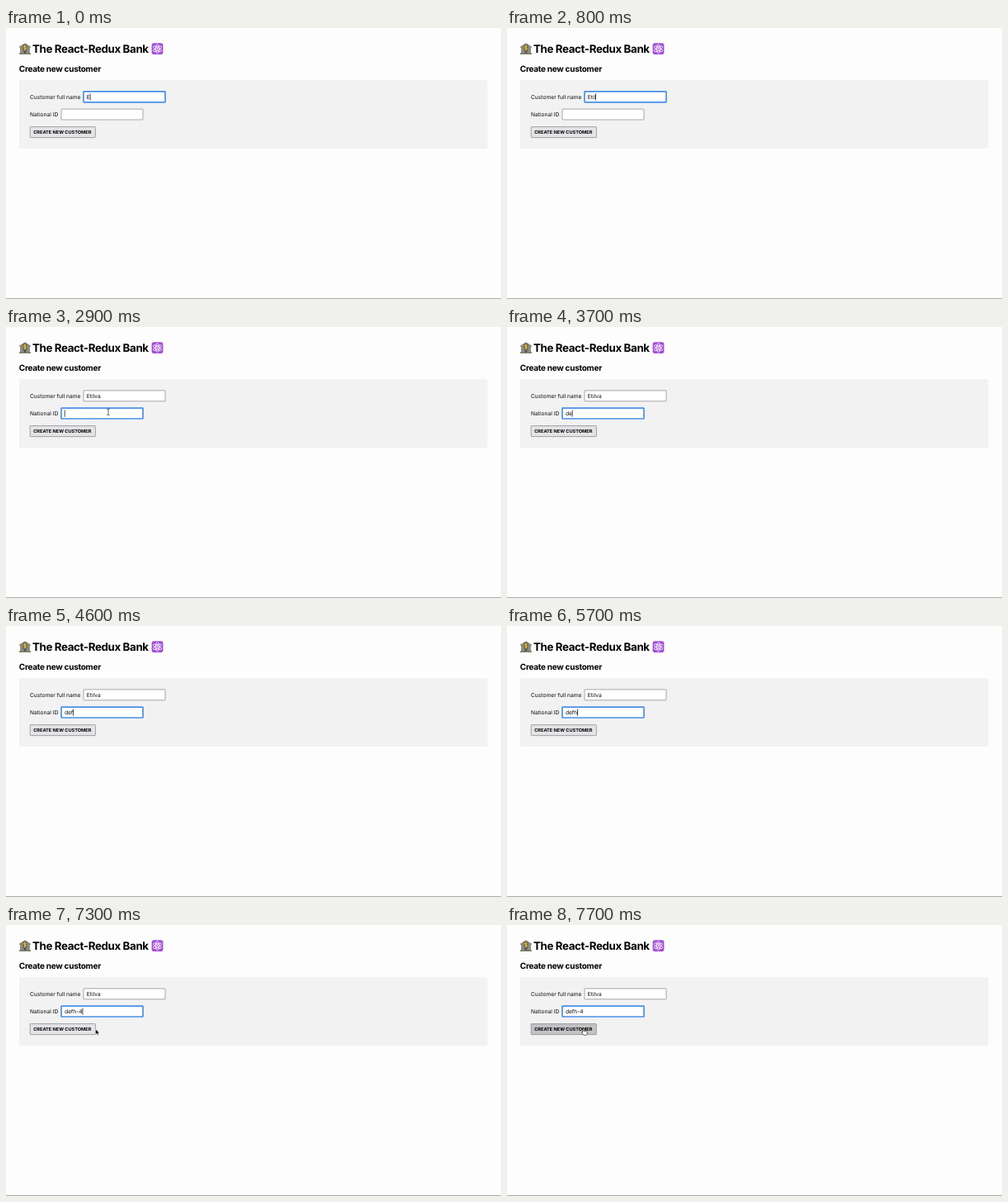
Write an HTML page that moves like this. It is 600 px wide and 328 px high and loops after 8000 ms.

```html
<!DOCTYPE html>
<html lang="en">
<head>
<meta charset="utf-8">
<title>The React-Redux Bank</title>
<style>
  html, body { margin: 0; width: 100%; height: 100%; overflow: hidden; background: #fdfdfd; }
  svg { display: block; width: 100vw; height: 100vh; }
  text {
    font: 400 6.67px Inter, "Liberation Sans", sans-serif;
    fill: #0c0c0c; text-rendering: geometricPrecision; white-space: pre;
  }
  .h1 { font-size: 13.33px; font-weight: 700; letter-spacing: -.028em; fill: #000; }
  .h2 { font-size: 10px; font-weight: 700; letter-spacing: -.028em; fill: #000; }
  .cta { font-size: 5.6px; font-weight: 700; fill: #000; }
  .field rect { fill: #fff; stroke: #858585; stroke-width: .7; }
  .field.focus rect { stroke: #4a90e8; stroke-width: 1.7; }
  .field line { stroke: #111; stroke-width: .75; }
  #button { fill: #e4e4e7; stroke: #858587; stroke-width: .7; }
  #button.hover { fill: #c3c3c6; }
</style>
</head>
<body>
<svg viewBox="0 0 600 328">
  <rect width="600" height="328" fill="#fdfdfd"/>
  <rect y="327" width="600" height="1" fill="#aaa"/>

  <g id="bank">
    <path d="M16.2 22.6 23 18.2 29.8 22.6V24H16.2Z" fill="#8b8980"/>
    <path d="M17 24H29V31H17Z" fill="#a5a399"/>
    <path d="M18.2 24V31M20.4 24V31M25.6 24V31M27.8 24V31" stroke="#6d6d69" stroke-width=".9"/>
    <rect x="20.6" y="20" width="4.8" height="7.8" rx="1.4" fill="#665e3c"/>
    <path d="M24.6 22.4Q23 21 21.8 22.1T23 23.9 24.2 25.6 21.4 25.4M23 20.7V27" fill="none" stroke="#f5d33f" stroke-width=".9"/>
    <rect x="21.7" y="28" width="2.6" height="3" fill="#494a4b"/>
    <rect x="16" y="30.6" width="14" height="1.3" fill="#797871"/>
    <path d="M16.2 30.8H20M26 30.8H29.8" stroke="#698c4a" stroke-width="1.3"/>
  </g>

  <g fill="none" stroke="#fff" stroke-width=".8">
    <rect x="176.6" y="18.3" width="13.8" height="13.8" rx="2.8" fill="#a34fd4" stroke="none"/>
    <ellipse cx="183.5" cy="25.2" rx="2.1" ry="5.5"/>
    <ellipse cx="183.5" cy="25.2" rx="2.1" ry="5.5" transform="rotate(60 183.5 25.2)"/>
    <ellipse cx="183.5" cy="25.2" rx="2.1" ry="5.5" transform="rotate(120 183.5 25.2)"/>
    <circle cx="183.5" cy="25.2" r=".9" fill="#fff" stroke="none"/>
  </g>

  <text class="h1" x="32" y="30">The React-Redux Bank</text>
  <text class="h2" x="15.8" y="53">Create new customer</text>
  <rect x="16" y="63.3" width="567.5" height="82.7" fill="#f2f2f2"/>

  <text x="29" y="85.9">Customer full name</text>
  <g class="field" id="name">
    <rect x="94" y="76.9" width="99" height="12.9" rx=".6"/>
    <text x="97.8" y="85.9"></text>
    <line y1="79.3" y2="87.6"/>
  </g>

  <text x="29" y="107.1">National ID</text>
  <g class="field" id="nid">
    <rect x="67" y="98.1" width="99" height="12.9" rx=".6"/>
    <text x="70.9" y="107.1"></text>
    <line y1="100.5" y2="108.8"/>
  </g>

  <rect id="button" x="29.2" y="119.6" width="79.2" height="13" rx=".6"/>
  <text class="cta" x="33.2" y="128.1">CREATE NEW CUSTOMER</text>

  <g id="mouse">
    <path id="arrow" d="M0 0V6.5L1.5 5.2 2.5 7.4 3.7 6.9 2.7 4.8H4.7Z" fill="#000" stroke="#fff" stroke-width=".5"/>
    <path id="beam" d="M-1.6-3.7Q0-3.7 0-2.8 0-3.7 1.6-3.7M0-2.8V2.8M-1.6 3.7Q0 3.7 0 2.8 0 3.7 1.6 3.7" fill="none" stroke="#222" stroke-width=".7"/>
    <path id="hand" d="M-.8 .6Q0-.5 .7 .6V3Q1.6 2.5 2.1 3.2 3 2.8 3.4 3.5 4.5 3.3 4.6 4.4 4.6 6.2 3.7 7.7H.2Q-1 6.2-2.2 4.6-2.2 3.5-.8 4.4Z" fill="#fff" stroke="#111" stroke-width=".6"/>
  </g>
</svg>
<script>
const LOOP = 8000, STEP = 100;
const FOCUS_ID = 2900;
const $ = id => document.getElementById(id);

// Times at which each character arrives.
const nameKeys = { value: "Etilva", times: [0, 300, 500, 800, 1500, 1700] };
const idKeys = { value: "defh-4", times: [3600, 3700, 4600, 4700, 6000, 6200] };

// Spans in which the caret is blinked off.
const caretOff = [[1100, 1500], [2100, 2600], [3400, 3600], [4200, 4600],
                  [5100, 5700], [6800, 7200], [7600, 8000]];

// Pointer paths as [time, x, y]; typing hides the pointer.
const paths = [
  { from: 2000, to: 3600, points: [[2000, 139, 84], [2200, 136, 87], [2400, 131, 95.3],
                                   [2600, 126, 102], [2800, 124, 103]] },
  { from: 6800, to: 8000, points: [[6800, 124, 103], [7000, 120, 112], [7300, 108.6, 126],
                                   [7500, 97, 126], [7700, 92.7, 125.5]] }
];

const typed = (keys, t) => keys.value.slice(0, keys.times.filter(k => k <= t).length);

function along(points, t) {
  const i = points.findIndex(p => p[0] > t);
  if (i < 0) return points[points.length - 1].slice(1);
  const [t0, x0, y0] = points[i - 1], [t1, x1, y1] = points[i];
  const k = (t - t0) / (t1 - t0);
  return [x0 + (x1 - x0) * k, y0 + (y1 - y0) * k];
}

function inside(rect, x, y) {
  const b = rect.getBBox();
  return x >= b.x && x <= b.x + b.width && y >= b.y && y <= b.y + b.height;
}

const show = (el, on) => el.setAttribute("visibility", on ? "visible" : "hidden");

function drawField(id, value, focused, caretOn) {
  const field = $(id), text = field.querySelector("text"), caret = field.querySelector("line");
  field.classList.toggle("focus", focused);
  if (text.textContent !== value) text.textContent = value;
  const x = +text.getAttribute("x") + (value ? text.getComputedTextLength() : 0) + .3;
  caret.setAttribute("x1", x);
  caret.setAttribute("x2", x);
  show(caret, focused && caretOn);
}

function drawMouse(t) {
  const path = paths.find(p => t >= p.from && t < p.to);
  let shape = "", hover = false;
  if (path) {
    const [x, y] = along(path.points, t);
    const overField = [...document.querySelectorAll(".field rect")].some(r => inside(r, x, y));
    hover = inside($("button"), x, y);
    shape = hover ? "hand" : overField ? "beam" : "arrow";
    $("mouse").setAttribute("transform", `translate(${x} ${y})`);
  }
  for (const id of ["arrow", "beam", "hand"]) show($(id), id === shape);
  $("button").classList.toggle("hover", hover);
}

function draw(now) {
  const t = Math.floor(now % LOOP / STEP) * STEP;
  const caretOn = !caretOff.some(([a, b]) => t >= a && t < b);
  drawField("name", typed(nameKeys, t), t < FOCUS_ID, caretOn);
  drawField("nid", typed(idKeys, t), t >= FOCUS_ID, caretOn);
  drawMouse(t);
}

const start = performance.now();
function tick() {
  draw(performance.now() - start);
  requestAnimationFrame(tick);
}
tick();
</script>
</body>
</html>
```
